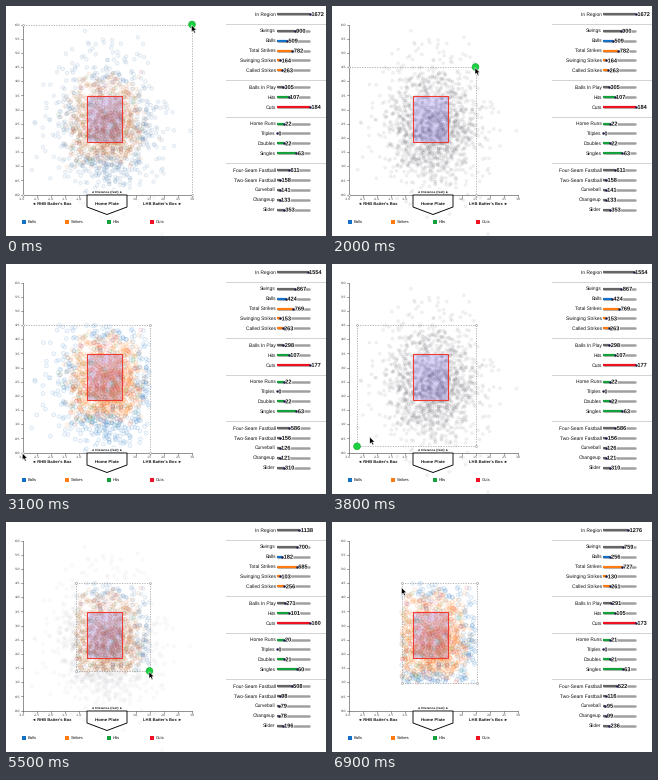
Write a matplotlib script that moves like this. It is 320 px wide and 230 px high and loops after 7000 ms.

```python
import numpy as np
import matplotlib.pyplot as plt
import matplotlib.patheffects as pe
from matplotlib.animation import FuncAnimation
from matplotlib.colors import to_rgb
from matplotlib.patches import Circle, Polygon, Rectangle

W, H, DPI = 320, 230, 80
PT = 72 / DPI  # points per pixel
FRAMES, STEP = 70, 100

plt.rcParams["font.family"] = ["Liberation Sans", "DejaVu Sans"]
plt.rcParams["text.hinting"] = "none"

BLUE, ORANGE, GREEN, RED = "#1470c4", "#ff7a10", "#14a03c", "#ee1122"
DARK, TRACK, AXIS = "#666666", "#a0a0a0", "#666666"
LEFT, RIGHT, TOP, BOTTOM = 16.5, 186, 18.5, 188.5

fig = plt.figure(figsize=(W / DPI, H / DPI), dpi=DPI, facecolor="white")
ax = fig.add_axes([0, 0, 1, 1])
ax.set_xlim(0, W)
ax.set_ylim(H, 0)
ax.axis("off")


def text(x, y, s, px, ha="left", color="#111111", z=6, **kw):
    """Place text with its middle near y."""
    return ax.text(x, y + px * 0.36, s, fontsize=px * PT, ha=ha,
                   va="baseline", color=color, zorder=z, **kw)


def line(xs, ys, px=1.0, color="black", z=3, **kw):
    return ax.plot(xs, ys, lw=px * PT, color=color, zorder=z, **kw)[0]


def ease(t, t0, t1):
    u = np.clip((t - t0) / (t1 - t0), 0, 1)
    return u * u * (3 - 2 * u)


def mix(a, b, u):
    return a + (b - a) * u


# Pitch locations: balls grow likelier away from the strike zone
rng = np.random.default_rng(11)
N = 1690
px_ = rng.normal(101, 23, N)
py_ = rng.normal(120, 29, N)
miss = np.hypot(np.maximum(abs(px_ - 98.5) - 17, 0),
                np.maximum(abs(py_ - 113) - 23, 0))
ball = rng.random(N) < 1 / (1 + np.exp((17 - miss) / 4))
kind = np.where(ball, 0, rng.choice([1, 2, 3], N, p=[0.8, 0.08, 0.12]))
tints = np.array([to_rgb(c) for c in (BLUE, ORANGE, GREEN, RED)])[kind]
grey = np.array(to_rgb("#504a55"))
dots = ax.scatter(px_, py_, s=9, linewidths=0.7 * PT, zorder=2)


def paint_dots(k, box):
    """k = 0 shows every pitch in grey, k = 1 only the boxed ones in colour."""
    x0, y0, x1, y1 = box
    inside = (px_ > x0) & (px_ < x1) & (py_ > y0) & (py_ < y1)
    rgb = np.where(inside[:, None], mix(grey, tints, k), grey)
    edge = np.where(inside, mix(0.06, 0.17, k), 0.06 * (1 - k))
    face = np.where(inside, mix(0.07, 0.04, k), 0.07 * (1 - k))
    dots.set_edgecolor(np.column_stack([rgb, edge]))
    dots.set_facecolor(np.column_stack([rgb, face]))
    dots.set_sizes([(mix(3.0, 3.8, k) * PT) ** 2])


# Strike zone
zone = dict(xy=(81, 90), width=34.5, height=46)
ax.add_patch(Rectangle(**zone, fc="#6a50ff", alpha=0.2, lw=0, zorder=3))
ax.add_patch(Rectangle(**zone, fc="none", ec="#ee3b33", lw=1.1 * PT, zorder=4))

# Axes
line([LEFT, LEFT], [TOP, BOTTOM], 0.7, AXIS)
line([LEFT, RIGHT], [BOTTOM, BOTTOM], 0.7, AXIS)
for i in range(13):
    x, y = mix(LEFT, RIGHT, i / 12), mix(BOTTOM, TOP, i / 12)
    line([LEFT - 2, LEFT], [y, y], 0.6, AXIS)
    line([x, x], [BOTTOM, BOTTOM + 2], 0.6, AXIS)
    text(LEFT - 2, y, f"{i / 2:.1f}", 3.5, "right", "#444444", family="DejaVu Sans")
    text(x, BOTTOM + 4.5, f"{i / 2 - 3:.1f}", 3.2, "center", "#555555", 3,
         family="DejaVu Sans")

# Home plate and captions
ax.add_patch(Rectangle((85, 183), 32, 5, fc="white", alpha=0.85, lw=0, zorder=5))
plate = [(81, 189), (121, 189), (121, 201), (101, 208.5), (81, 201)]
ax.add_patch(Polygon(plate, fc="white", ec="black", lw=0.9 * PT, zorder=5))
text(101, 185.6, "◄ Distance (feet) ►", 3.4, "center", weight="bold")
text(101, 197.5, "Home Plate", 4.4, "center", weight="bold")
text(26, 197.5, "◄ RHB Batter's Box", 4.1, weight="bold")
text(176, 197.5, "LHB Batter's Box ►", 4.1, "right", weight="bold")

legend = zip(("Balls", "Strikes", "Hits", "Outs"), (BLUE, ORANGE, GREEN, RED))
for i, (name, c) in enumerate(legend):
    x = 16 + 42.5 * i
    ax.add_patch(Rectangle((x, 213.5), 4, 4, fc=c, lw=0, zorder=5))
    text(x + 6, 215.5, name, 4.1)


# Counter panel: groups of (label, colour, label that sets the full width)
def rows(color, ref, *names):
    return [(name, color, ref) for name in names]


ALL = "In Region"
GROUPS = [
    rows(DARK, None, ALL),
    rows(DARK, ALL, "Swings") + rows(BLUE, ALL, "Balls")
    + rows(ORANGE, ALL, "Total Strikes", "Swinging Strikes", "Called Strikes"),
    rows(DARK, ALL, "Balls In Play") + rows(GREEN, "Balls In Play", "Hits")
    + rows(RED, "Outs", "Outs"),
    rows(GREEN, "Hits", "Home Runs", "Triples", "Doubles", "Singles"),
    rows(DARK, ALL, "Four-Seam Fastball", "Two-Seam Fastball", "Curveball",
         "Changeup", "Slider"),
]


def tally(region, balls, strikes, swinging, called, in_play, outs,
          homers, doubles, singles, *pitches):
    """Counts in panel order; swings and hits follow from the others."""
    hits = homers + doubles + singles
    return (region, region - balls - called, balls, strikes, swinging, called,
            in_play, hits, outs, homers, 0, doubles, singles, *pitches)


# One tally per selected region
COUNTS = [
    tally(1672, 509, 782, 164, 263, 305, 184, 22, 22, 63, 611, 158, 141, 133, 353),
    tally(1554, 424, 769, 153, 263, 298, 177, 22, 22, 63, 586, 156, 126, 121, 310),
    tally(1138, 182, 685, 103, 256, 271, 160, 20, 21, 60, 508, 98, 79, 78, 196),
    tally(1276, 256, 727, 130, 261, 291, 173, 21, 21, 63, 522, 116, 95, 99, 236),
]
BAR0, BAR1 = 271, 304
halo = [pe.withStroke(linewidth=1.5 * PT, foreground="white")]

panel = []
y = 8
for g, group in enumerate(GROUPS):
    if g:
        y += 16.7
        line([220, W], [y - 6.7, y - 6.7], 0.8, "#c8c8c8")
    for r, (name, color, ref) in enumerate(group):
        y += 9.9 * (r > 0)
        text(269.7, y, name, 4.85, "right")
        line([BAR0 + 1, BAR1 - 1], [y, y], 2.5, TRACK, solid_capstyle="round")
        bar = line([], [], 2.2, color, 4, solid_capstyle="butt")
        mark = line([], [], 0, "#1c1c4a", 7, marker="o", ms=2.4 * PT, mew=0)
        num = text(0, y, "", 5.6, weight="bold", path_effects=halo)
        panel.append((name, ref, y, bar, mark, num))


def paint_counts(values):
    by_name = {row[0]: v for row, v in zip(panel, values)}
    for name, ref, y, bar, mark, num in panel:
        full = by_name[ref] if ref else COUNTS[0][0]
        end = mix(BAR0, BAR1, by_name[name] / full)
        bar.set_data([BAR0, end], [y, y])
        mark.set_data([end], [y])
        num.set_text(str(by_name[name]))
        num.set_x(end + 1.4)


# Selection box, drag handle and pointer
edges = [line([], [], 0.7, "#999999", 4, dashes=(1.8, 1.8)) for _ in range(4)]
knobs = line([], [], 0, "#999999", 5, marker="o", ms=2 * PT, mfc="white", mew=0.6 * PT)
handle = ax.add_patch(Circle((0, 0), 3.4, fc="#19d23f", ec="#12a832",
                             lw=0.6 * PT, zorder=7))
ARROW = np.array([(0, 0), (0, 7), (1.6, 5.6), (2.8, 8.2), (4, 7.6),
                  (2.9, 5.2), (5, 5)])
pointer = ax.add_patch(Polygon(ARROW, fc="black", ec="white", lw=0.5 * PT, zorder=8))

# Corner drags: press and release time, box sides moved, start, end
NE, SW, SE = (2, 1), (0, 3), (2, 3)
A, B, C, D = (np.array(p) for p in
              ((143.5, 61), (69.5, 149), (143.5, 149), (144.5, 160.5)))
DRAGS = [
    (-100, 2000, NE, np.array((RIGHT, TOP)), A),
    (3200, 4500, SW, np.array((LEFT + 0.3, BOTTOM)), B),
    (5400, 6300, SE, C, D),
]
REST = np.array((70, 65))  # where the pointer ends up
FADE, LEAD = 300, 150


def corner(t, drag):
    press, release, _, a, b = drag
    return mix(a, b, ease(t, press + FADE + 100, release - 100))


def tip(t):
    """The pointer leads the dragged corner, then glides to the next one."""
    spot = DRAGS[0][3]
    for i, drag in enumerate(DRAGS):
        press, release = drag[:2]
        if t >= press:
            spot = corner(t + LEAD, drag)
        if t > release:
            more = i + 1 < len(DRAGS)
            goal = DRAGS[i + 1][3] if more else REST
            until = DRAGS[i + 1][0] - 200 if more else FRAMES * STEP - 100
            spot = mix(drag[4], goal, ease(t, release + 100, until))
    return spot + (-0.5, 0.5)


def update(i):
    t = i * STEP
    box = [LEFT, TOP, RIGHT, BOTTOM]
    color, region, held = 1.0, 0, None
    for drag in DRAGS:
        press, release, sides = drag[:3]
        if t >= press:
            box[sides[0]], box[sides[1]] = corner(t, drag)
            color = np.interp(t, [press, press + FADE, release, release + FADE],
                              [1, 0, 0, 1])
            region += t > release
            held = sides if t <= release + 100 else None
    paint_dots(color, box)
    paint_counts(COUNTS[region])

    x0, y0, x1, y1 = box
    ring = [(x0, y0), (x1, y0), (x1, y1), (x0, y1)]
    for j, edge in enumerate(edges):
        edge.set_data(*zip(*sorted((ring[j], ring[(j + 1) % 4]))))
    knobs.set_data(*zip(*ring))

    handle.set_visible(held is not None)
    if held:
        handle.center = box[held[0]], box[held[1]]
    pointer.set_xy(ARROW + tip(t))


anim = FuncAnimation(fig, update, frames=FRAMES, init_func=lambda: update(0),
                     interval=STEP, repeat=True, repeat_delay=0, blit=False)
plt.show()
```
